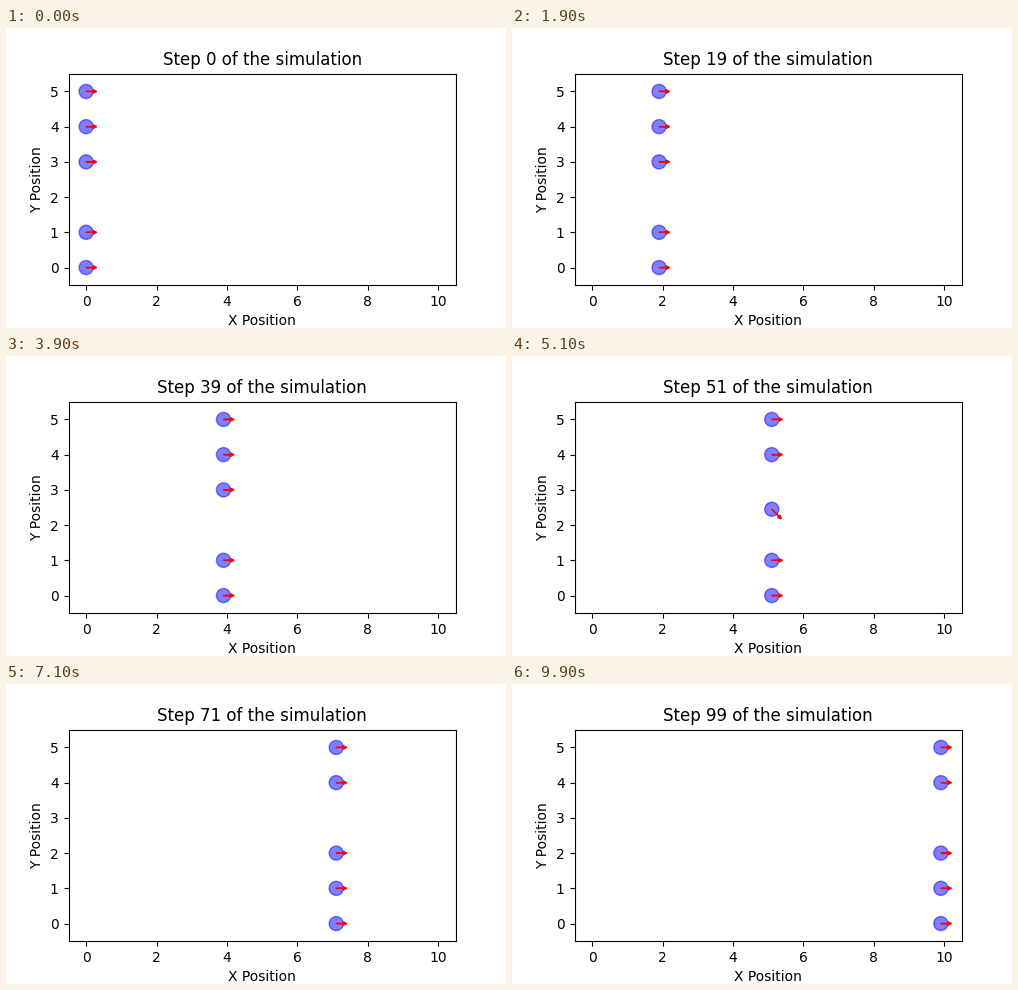
Animation, 500 px wide and 300 px high, one loop 10 s. Source, as a matplotlib script:

```python
import matplotlib.pyplot as plt
from matplotlib.animation import FuncAnimation
from matplotlib.patches import Circle

STEPS = 100
SPEED = 0.1
LANES = [0, 1, 3, 4, 5]
MOVER = 2                    # index of the particle that changes lane
TURN_START, TURN_END = 40, 60
ARROW = 0.2

fig, ax = plt.subplots(figsize=(5, 3), dpi=100)
ax.set_xlim(-0.5, 10.5)
ax.set_ylim(-0.5, 5.5)
ax.set_aspect("equal")
ax.set_xticks(range(0, 11, 2))
ax.set_yticks(range(6))
ax.set_xlabel("X Position")
ax.set_ylabel("Y Position")
title = ax.set_title("")

dots, arrows = [], []
for lane in LANES:
    dots.append(ax.add_patch(Circle((0, lane), 0.2, color="blue", alpha=0.5)))
    arrows.append(ax.arrow(0, lane, ARROW, 0, head_width=0.1, head_length=0.1,
                           fc="red", ec="red"))


def state(index, step):
    """Return the height and vertical heading of one particle."""
    y = LANES[index]
    if index != MOVER:
        return y, 0
    progress = (step - TURN_START) / (TURN_END - TURN_START)
    turning = TURN_START <= step < TURN_END
    return y - min(max(progress, 0), 1), -ARROW if turning else 0


def update(step):
    x = SPEED * step
    for i, (dot, arrow) in enumerate(zip(dots, arrows)):
        y, dy = state(i, step)
        dot.center = x, y
        arrow.set_data(x=x, y=y, dx=ARROW, dy=dy)
    title.set_text(f"Step {step} of the simulation")
    return [*dots, *arrows, title]


anim = FuncAnimation(fig, update, frames=STEPS, interval=100,
                     repeat=True, repeat_delay=0, blit=False)
plt.show()
```
